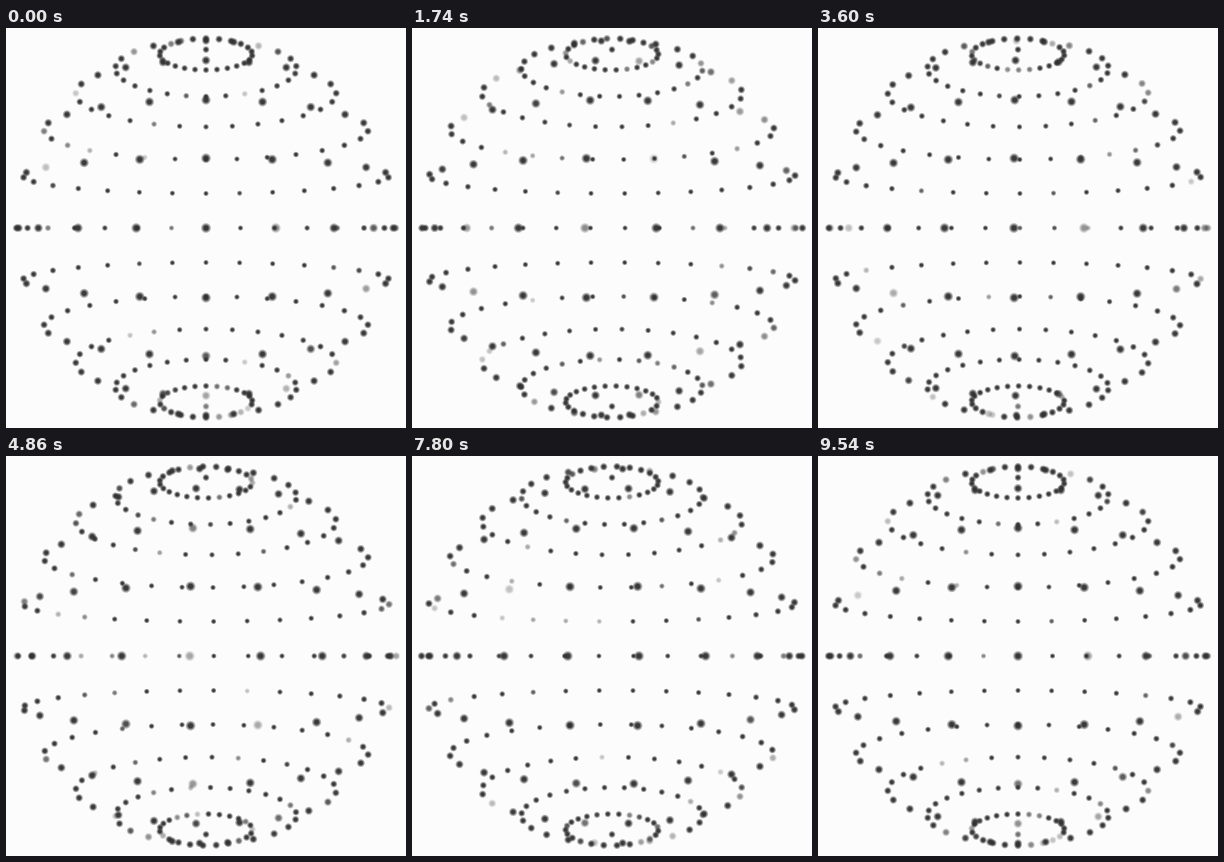
An HTML page with a canvas for the animation above (9570 ms loop, 400 by 400 pixels).

```html
<!DOCTYPE html>
<html lang="en">
<head>
<meta charset="utf-8">
<title>Dotted globe</title>
<style>
  html, body { margin: 0; width: 100%; height: 100%; overflow: hidden; background: #fcfcfc; }
  canvas { display: block; width: 100vw; height: 100vh; }
</style>
</head>
<body>
<canvas width="400" height="400"></canvas>
<script>
const ctx = document.querySelector('canvas').getContext('2d');
const STEP = 30, STEPS = 319, TAU = Math.PI * 2;
const RADIUS = 178.4;   // projected radius at the centre plane
const DEPTH = 0.35;     // sphere radius / camera distance
const DOT = 3.1;
const MERIDIANS = 24, PARALLELS = 12;

let seed = 7;
const random = () => (seed = seed * 16807 % 2147483647) / 2147483647;

const dots = [];
for (let row = 0; row <= PARALLELS; row++) {
  const polar = Math.PI * row / PARALLELS;
  const count = row % PARALLELS ? MERIDIANS : 1;
  for (let col = 0; col < count; col++) {
    dots.push({
      ring: Math.sin(polar),
      height: -Math.cos(polar),
      lon: TAU * col / count,
      phase: random(),
      cycles: 3 + Math.floor(random() * 4)
    });
  }
}

// Mostly opaque, with one short dip per cycle
function twinkle(dot, progress) {
  const u = (dot.phase + dot.cycles * progress) % 1;
  return Math.min(0.95, 0.25 + 6 * Math.abs(u - 0.5));
}

function drawDot(x, y, r, alpha) {
  const outer = r + 0.7;
  const fill = ctx.createRadialGradient(x, y, r * 0.45, x, y, outer);
  fill.addColorStop(0, 'rgba(48,48,48,1)');
  fill.addColorStop(1, 'rgba(48,48,48,0)');
  ctx.globalAlpha = alpha;
  ctx.fillStyle = fill;
  ctx.beginPath();
  ctx.arc(x, y, outer, 0, TAU);
  ctx.fill();
}

function draw(now) {
  const step = Math.floor(now / STEP) % STEPS;
  const turn = TAU * step / (STEPS - 1);
  ctx.globalAlpha = 1;
  ctx.fillStyle = '#fcfcfc';
  ctx.fillRect(0, 0, 400, 400);
  for (const dot of dots) {
    const angle = dot.lon - turn;
    const scale = 1 / (1 - DEPTH * dot.ring * Math.cos(angle));
    drawDot(
      200 + RADIUS * dot.ring * Math.sin(angle) * scale,
      200 + RADIUS * dot.height * scale,
      DOT * scale,
      twinkle(dot, step / STEPS)
    );
  }
}

const start = performance.now();
function loop() {
  draw(performance.now() - start);
  requestAnimationFrame(loop);
}
loop();
</script>
</body>
</html>
```
